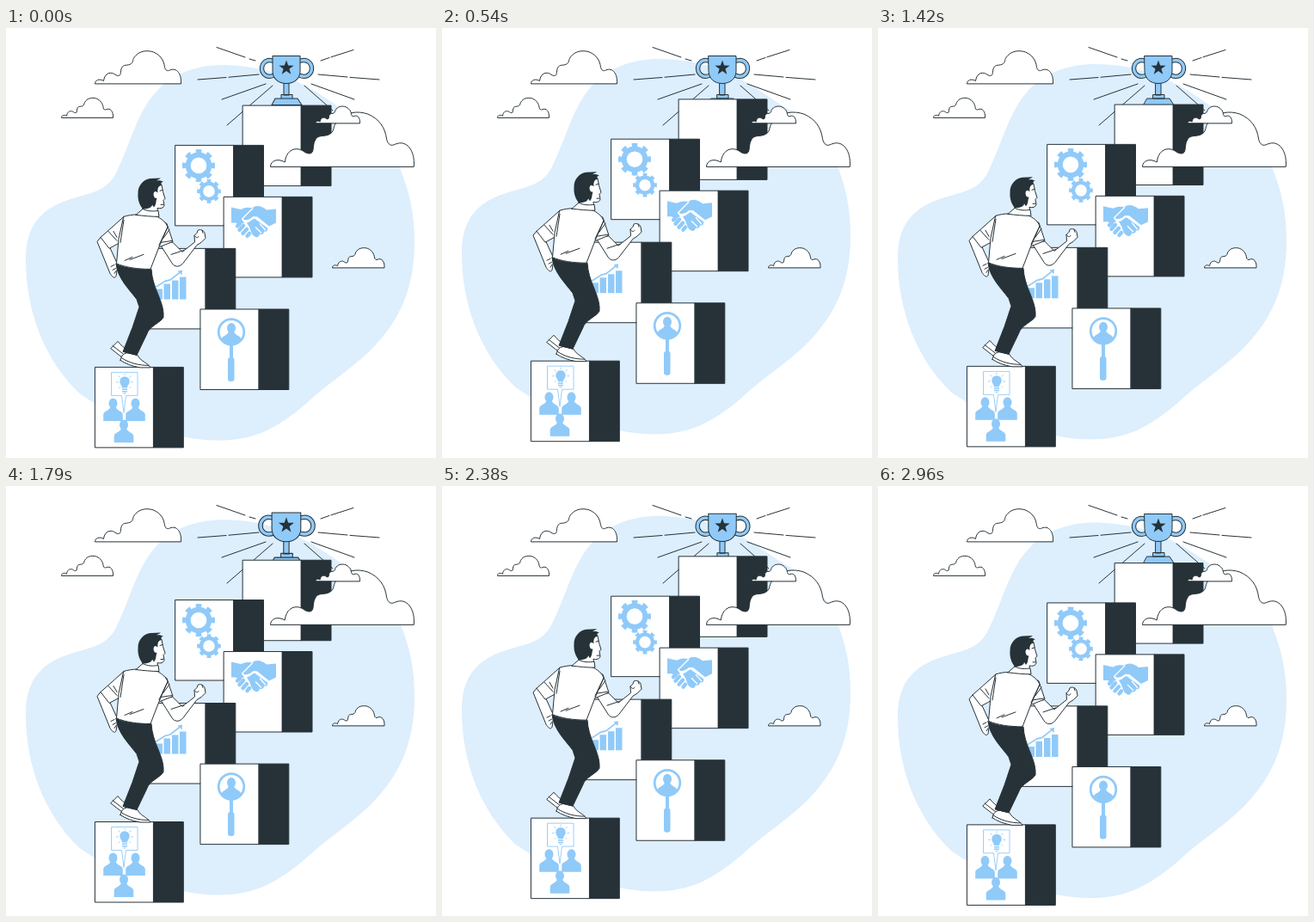
Write an HTML page that moves like this. It is 500 px wide and 500 px high and loops after 3 s.

```html
<!DOCTYPE html>
<html lang="en">
<head>
<meta charset="utf-8">
<title>Climbing to the cup</title>
<style>
  html, body { margin: 0; width: 100%; height: 100%; overflow: hidden; background: #fff; }
  svg { display: block; width: 100vw; height: 100vh; }
  .ink { stroke: #263238; stroke-width: 1; stroke-linecap: round; stroke-linejoin: round; }
  .white { fill: #fff; }
  .dark { fill: #263238; }
  .blue { fill: #90caf9; }
  .line { fill: none; }
  .blueLine { fill: none; stroke: #90caf9; }
  .gap { fill: none; stroke: #fff; stroke-width: 1.4; stroke-linejoin: round; }
</style>
</head>
<body>
<svg viewBox="0 0 500 500">
  <defs>
    <path id="cloud" vector-effect="non-scaling-stroke" d="M0 0C0-4 5-6 10-3C11-10 15-13 20-12C23-11.5 24-9 27-9C31-9 29-14 31-18C33-23 38-20 42-23C45-25 43-28 47-32C52-38 61-39 68-36.5C76-33 80-27 81-19C82-15 84-14 87-15.500C95-19 101-11 100 0Z"/>
    <g id="person">
      <ellipse rx="5" ry="6"/>
      <path d="M-11.3 20.5V13C-11.3 9-4 8.5-3 4H3C4 8.5 11.3 9 11.3 13V20.5Z"/>
    </g>
    <g id="gear" class="blueLine">
      <circle r="12.3" stroke-width="6"/>
      <circle r="16.5" stroke-width="5" pathLength="16" stroke-dasharray="1" stroke-dashoffset=".5"/>
    </g>
    <clipPath id="lens"><circle cx="262" cy="353" r="14"/></clipPath>
  </defs>

  <path class="float" fill="#ddeefd" d="M23 268C23 225 45 207 80 197C105 190 118 187 128 168C146 132 152 96 178 70C200 49 230 41 262 43C310 45 345 62 382 88C400 102 440 115 459 165C469 190 475 215 475 248C475 302 458 340 424 374C397 400 372 414 347 438C317 463 290 479 250 479C230 479 215 477 200 473C150 462 115 445 85 424C45 385 23 330 23 268Z"/>

  <path class="ink line" d="M245 22.5L278 34M283 36L290 38M223 60L256 57.5M259 57.2L294 54M251 83L302 65M310 67L257 113M366 38L376 34.5M378 33.8L404 25.5M363 54L397 57M400 57.4L434 60M355 65L405 83M347 67L380 96"/>

  <g id="trophy" class="ink blue">
    <g id="handles" fill="none"></g>
    <path d="M323 63H329V78H323ZM320 77.5H333V82H320ZM313 82H339L344 89.5H309Z"/>
    <path d="M310 32.5H342V50C342 59 335 64.5 326 64.5S310 59 310 50Z"/>
    <path id="star" class="dark" stroke="none"/>
  </g>

  <g class="float">
    <g id="boxes"></g>

    <g class="blue">
      <use href="#gear" transform="translate(224 159.5)"/>
      <use href="#gear" transform="translate(236 189.5) scale(.73)"/>

      <path d="M262 208L273 210.5C278 208 283 208 287 209L274 222L277 226L271 228L267 226H262Z"/>
      <path d="M314 210L303 211C297 206 291 205 286 209L275 221C278 225 284 222 287 219L292 219L306 230L314 226Z"/>
      <path d="M280 226C284 225 286 222 289 221L304 232C305 236 302 237 300 236C300 240 296 240 295 239C294 244 290 244 286 239L283 231Z"/>
      <path class="blueLine" stroke-width="4.4" stroke-linecap="round" d="M269 230L272 227M271.500 234.500L276 229.500M275.500 238.500L280 233.500M280.500 241.500L283 238.500"/>
      <path class="gap" d="M287 209L274.5 221.5C278 226 284 223 288 219.5L292 220L306 232M290 231L297 238M295 227L302 235"/>

      <path d="M174.5 303H182V315H174.5ZM183.5 297H191V315H183.5ZM193 293H200.5V315H193ZM202 289H209.5V315H202Z"/>
      <path class="blueLine" stroke-width="1.7" d="M174 301L185 294L191 292.5L203 283"/>
      <path d="M199.5 282L205 281L204.5 287Z"/>

      <circle class="blueLine" cx="262" cy="353" r="14.8" stroke-width="2.8"/>
      <g clip-path="url(#lens)"><use href="#person" x="262" y="348.5"/></g>
      <path d="M260 368H264V384H260Z"/>
      <rect x="258" y="382.5" width="7.5" height="28" rx="3"/>

      <path class="blueLine" stroke-width=".9" d="M134.5 427H122.5V400H153V427H139.5L137 447ZM138 401.5V403.5M128 411.5H130.5M145.5 411.5H148M130.5 404L132.5 406M145.5 404L143.5 406M131 418.5L132.5 417M145 418.5L143.5 417"/>
      <path d="M135 418C135 415 132.3 414 132.3 410.5A5.7 5.7 0 0 1 143.7 410.5C143.7 414 141 415 141 418ZM135 419H141V420.5H135ZM135 421.5H141V423H135ZM136.5 424H139.5V425H136.5Z"/>
      <use href="#person" x="124.5" y="436"/>
      <use href="#person" x="150.5" y="436"/>
      <use href="#person" x="137" y="461"/>
    </g>

    <g class="ink white">
      <path d="M119 251L130 275L128 288C127 291 124 290 121 285L106 248L110 243Z"/>
      <path class="line" d="M122 277L126 275M124 281L127.5 279M126 285L128 282"/>
      <path d="M179 251L193 273C196 278 202 278 206 273L222 252L227 249L232 244L231 238C230 235 226 233 223 235L222 238L219 241L219.5 248.500L205 260L194 249Z"/>
      <path class="line" d="M219 241C221 244 223 244 224 242M228 235L229 238M192 263L207 258"/>
      <path d="M122 372L130 364C133 368 138 372 141 374L138 383L133 381Z"/>
      <path class="line" d="M124 369L138 380"/>
      <path d="M133 386C134 380 138 377 142 377.5L153 380C156 387 165 389 168 394.5H156C147 393 139 390 133 386Z"/>
      <path class="line" d="M134 383C143 389 154 392 166 392"/>
      <path class="dark" d="M128 274C140 280 155 280 169 280C170 301 182 315 183 331V336C180 342 166 347 164 355L152 380L136 376L147 348L155 324L152 315C143 303 130 291 128 274Z"/>
      <path d="M137 219L118 236L110 243L120 256L131 250Z"/>
      <path d="M172 219L187 227L194 248L179 254Z"/>
      <path d="M137 219C145 216 163 215 176 219C183 223 186 226 188 231L178 254L168 280C153 280 139 278 128.5 273.5L131 245Z"/>
      <path class="line" d="M137 223L133 249M119 236L129 247M125 236L129 243M188 231L178 252M180 249L193 247M183 244L190 234M138 270L147 266M144 269L160 263"/>
      <path d="M174 181L181 182L182.5 190L185 198L183 200L184 206C183 209 180 210 176 209L177 216L158 213L160 206Z"/>
      <path d="M151 217L159 210C165 213 171 213 177 212L178 219C169 219 160 218 151 217Z"/>
      <path class="dark" stroke="none" d="M159 210C155 205 153 199 153.500 192C153 182 161 175 168 174.500L180 174C178 175.500 176 176 175 177C178 176.500 181 177 183 178.500C180 178.500 180 181 181.500 182.500C177 183 176 186 176.500 191L174 189.500C171 190 171 194 173 197L175.500 197.500C174 201 175 205 172 208L170 205C170 208 165 210 159 210Z"/>
      <path class="line" d="M179 189L182 188M180 205H183"/>
    </g>
  </g>

  <g id="clouds" class="ink white"></g>
</svg>

<script>
const $ = id => document.getElementById(id);

// Far to near: left edge, top edge.
const boxes = [[275.5, 89.7], [197, 136], [253.5, 196], [164.3, 256], [226.3, 326.6], [103.8, 394]];
$('boxes').innerHTML = boxes.map(([x, y]) => `
  <rect class="ink white" x="${x}" y="${y}" width="68" height="93.500"/>
  <rect class="ink dark" x="${x + 68}" y="${y}" width="34.5" height="93.500"/>`).join('');

// Left edge, baseline, scale.
const clouds = [[103.5, 64.5, 1], [64.5, 104, .6], [379.5, 278.5, .605], [307.5, 161, 1.668], [360, 110.5, .515]];
$('clouds').innerHTML = clouds.map(([x, y, s]) =>
  `<use href="#cloud" transform="translate(${x} ${y}) scale(${s})"/>`).join('');

const handles = 'M313 39C310 38 308 37.5 306.5 37.5A9 9.4 0 0 0 306.5 56.3C309 56.3 311 55.5 313 54.5'
  + 'M339 39C342 38 344 37.5 346.5 37.5A9 9.4 0 0 1 346.5 56.3C344 56.3 342 55.5 339 54.5';
$('handles').innerHTML = [['#263238', 5.3], ['#90caf9', 3.3]].map(([color, width]) =>
  `<path d="${handles}" stroke="${color}" stroke-width="${width}"/>`).join('');

const starPoints = Array.from({ length: 10 }, (_, i) => {
  const r = i % 2 ? 3.6 : 9, a = i * Math.PI / 5;
  return `${326 + r * Math.sin(a)} ${46.5 - r * Math.cos(a)}`;
});
$('star').setAttribute('d', `M${starPoints.join('L')}Z`);

const PERIOD = 1500;
const REST_Y = .4;
const beat = [[0, 1], [.1, 1.1], [.3, 1], [.4, 1], [.5, 1.1], [.6, 1], [1, 1]];
const floaters = document.querySelectorAll('.float');

function interpolate(keys, p) {
  const i = keys.findIndex(([at]) => at > p);
  const [p0, v0] = keys[i - 1], [p1, v1] = keys[i];
  return v0 + (v1 - v0) * (p - p0) / (p1 - p0);
}

function draw(now) {
  const p = (now % PERIOD) / PERIOD;
  const y = REST_Y - 10 * (1 - Math.abs(2 * p - 1));
  floaters.forEach(el => el.setAttribute('transform', `translate(0 ${y})`));
  const scale = interpolate(beat, p);
  $('trophy').setAttribute('transform', `translate(327 61) scale(${scale}) translate(-327 -61)`);
}

function tick() {
  draw(performance.now());
  requestAnimationFrame(tick);
}
tick();
</script>
</body>
</html>
```
